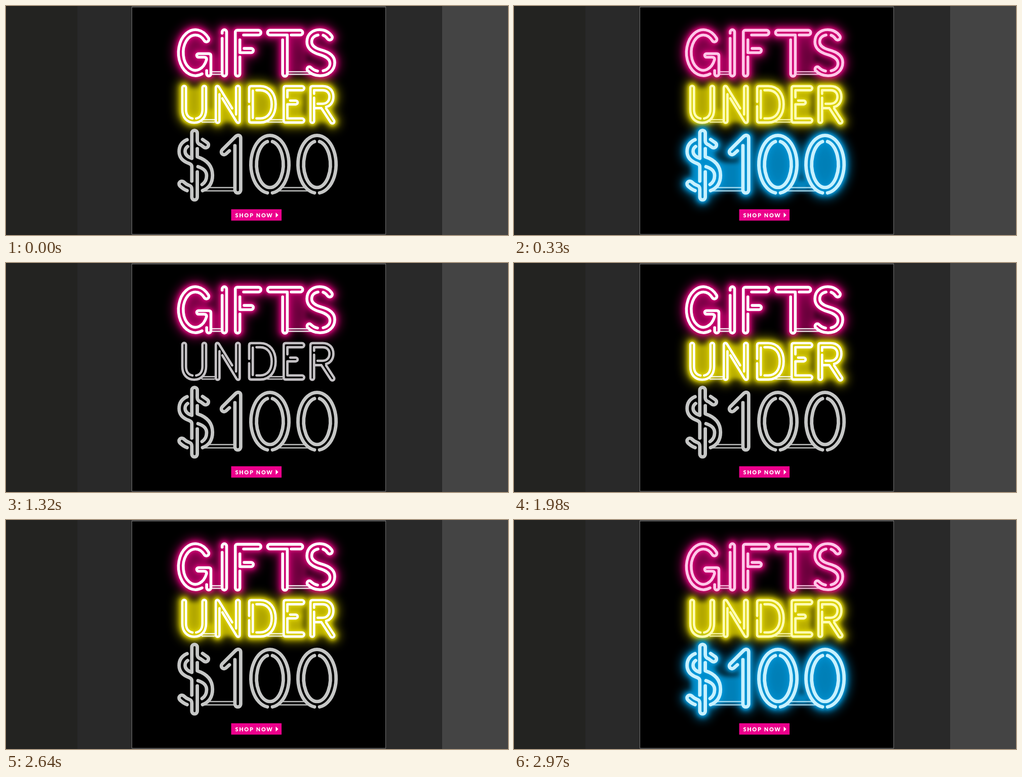
Recreate the animation shown at these times as an HTML page with a canvas. Size 991x454 px, loop 3.3 s.

```html
<!DOCTYPE html>
<html lang="en">
<head>
<meta charset="utf-8">
<title>Gifts under $100</title>
<style>
html, body { margin: 0; width: 100%; height: 100%; overflow: hidden; background: #292929; }
canvas { display: block; }
</style>
</head>
<body>
<canvas id="stage" width="991" height="454"></canvas>
<script>
const W = 991, H = 454, LOOP = 3300;
const ctx = document.getElementById('stage').getContext('2d');
const OFF = 0, WHITE = 1, TINT = 2;

// Each word: tube outlines, thin connectors, and the enclosed areas that fill with light.
const words = [
  {
    width: 5.6, off: '#c6c6c6', tint: '#ffc8e8', glow: '#e6007e', core: '#c4006f', fillAlpha: 0.5,
    tubes: [
      // G
      'M387 134.5A33.5 45.5 0 1 1 400 64A4.9 4.9 0 0 1 392 69.5A24 35 0 1 0 396 106' +
      'Q396 101.5 391 101.5H380a3.5 3.5 0 0 1 0-7H400Q404.5 94.5 404.5 99V134.5a4.2 4.2 0 0 1-8.4 0V128',
      // I
      'M426.7 54V51.5a4.4 4.4 0 0 1 8.8 0V134.5a4.4 4.4 0 0 1-8.8 0V64',
      // F
      'M469 57.5H498.5a4.7 4.7 0 0 0 0-9.4H457Q452.7 48 452.7 52.5V134.5a4.5 4.5 0 0 0 9 0V101',
      'M461.7 67V92.5H484a4.2 4.2 0 0 0 0-8.4H470',
      // T
      'M563 57.5H581a4.7 4.7 0 0 0 0-9.4H521a4.7 4.7 0 0 0 0 9.4H555.3V134.5a4.6 4.6 0 0 1-9.2 0V67',
      // S
      'M626 128.5C634 127 640 121 639.5 113C639 104 630 99.5 618 96C603 91.5 594 84 594 71' +
      'C594 56 605 47 619 47C630 47 638 52 643 59A4.8 4.8 0 0 1 635 65.5C632 61 629 59 626 58',
      'M616 57.5C608 59 603.5 64 603.5 71C603.5 80 612 84 622 87C639 91.5 649 99 649 112' +
      'C649 128 636 138.3 620 138.3C609 138.3 601 134 595 127.5A4.5 4.5 0 0 1 601.5 121.5C606 126 610 128 615 129'
    ],
    links: 'M407 130.3H424M407 135.3H424M558 130.3H600M558 135.3H602',
    fill: 'M374 58a24 35 0 1 0 .1 0ZM406 100H425V134H406ZM556 64H594V134H556Z'
  },
  {
    width: 4.8, off: '#c4c1c4', tint: '#fffcb4', glow: '#e6dc00', core: '#d2c600', fillAlpha: 0.78,
    tubes: [
      // U
      'M368 223C360 221.5 355.3 215 355.3 205V162a3.6 3.6 0 0 0-7.2 0V205C348 221 357 231.3 371.5 231.3' +
      'S395 221 395 205V162a3.6 3.6 0 0 0-7.2 0V205C387.8 215 383 221.5 375.5 223',
      // N
      'M446.5 203L421 161.5C418.5 157 414.2 158 414.2 163V228a3.6 3.6 0 0 0 7.2 0V175',
      'M427 183L454.5 228.5C457.5 233.5 461.4 232 461.4 227V162a3.6 3.6 0 0 0-7.2 0V215',
      // D
      'M480 190V163Q480 158.8 484 158.8H502C521 158.8 532.3 174 532.3 195S521 231 502 231H484Q480 231 480 227V199',
      'M487.2 168V222',
      'M494.5 167H502C516 167 524.5 178 524.5 195S516 222.8 502 222.8H494.5',
      // E
      'M555.5 181V167H584.5a4 4 0 0 0 0-8.1H552Q548.2 159 548.2 163V227Q548.2 231 552 231H584.5a4 4 0 0 0 0-8.1H555.5V195H572a3.7 3.7 0 0 0 0-7.4H561',
      // R
      'M608.2 174V167H625C633 167 638.5 172 638.5 180S633 193.8 625 193.8H615',
      'M632 203L647.5 227A3.8 3.8 0 0 1 641 231L622.5 202.5H608.2',
      'M632 200C641 198 646.3 190 646.3 180C646.3 167 638 158.8 625 158.8H605Q601 158.8 601 163V228a3.6 3.6 0 0 0 7.2 0V182'
    ],
    links: 'M388 225.4H412M386 230.2H412M520 225.4H546M516 230.2H546',
    fill: 'M350 162H392V228H350ZM386 205H414V230H386ZM414 162H461V230H414ZM480 160H530V230H480ZM528 200H548V230H528ZM548 160H586V230H548ZM601 160H642V230H601Z'
  },
  {
    width: 6.8, off: '#c6c7c6', tint: '#c8f1ff', glow: '#009fe3', core: '#0090cf', fillAlpha: 0.88,
    tubes: [
      // $
      'M388 264.5L398 271.5A5.6 5.6 0 0 1 391.5 280.5L384 275Q377.6 273 377.6 267V252a5.4 5.4 0 0 0-10.8 0V302' +
      'C358 299 353.5 295 353.5 288C353.5 284 355 281 358.5 278.5',
      'M357.5 265C347 269.5 341.7 278 341.7 288.5C341.7 301 350 308 361 312Q366.8 314 366.8 319V347',
      'M377.6 283V299C396 305 407.7 316 407.7 335.5C407.7 351 401 361 388 366',
      'M379 318.5C390 322 396 327 396 336.5C396 345 393 350 387 354',
      'M357.5 366C352 364 347 360.5 343 356.5A5.5 5.5 0 0 1 350.5 348.5C354 352 357 354 361 355.5Q366.8 357 366.8 363V379a5.4 5.4 0 0 0 10.8 0V329',
      // 1
      'M441 287L434.5 293A5.4 5.4 0 0 1 426.5 285.5L453 259C457.5 254.5 463.3 256 463.3 262V365a5.7 5.7 0 0 1-11.4 0V277',
      zero(521), zero(614)
    ],
    links: 'M397 360H449M392 366.5H449M543 360H593M537 366.5H599',
    fill: 'M521 268a26 45 0 1 0 .1 0ZM614 268a26 45 0 1 0 .1 0ZM400 310H454V366H380ZM554 345H581V366H554ZM350 275H396V358H350Z'
  }
];

function zero(cx) {
  return `M${cx - 5} 370.5A37.6 57.2 0 1 1 ${cx + 5} 370.5` +
         `M${cx + 5} 268.8A26.3 46 0 1 1 ${cx - 5} 268.8`;
}

// start time, then the state of each word
const timeline = [
  [0, WHITE, WHITE, OFF],
  [330, TINT, TINT, TINT],
  [990, OFF, OFF, OFF],
  [1320, WHITE, OFF, OFF],
  [1980, WHITE, WHITE, OFF],
  [2310, WHITE, WHITE, WHITE],
  [2640, WHITE, WHITE, OFF],
  [2970, TINT, TINT, TINT]
];

for (const word of words) {
  word.tubePath = new Path2D(word.tubes.join(''));
  word.linkPath = new Path2D(word.links);
  word.fillPath = new Path2D(word.fill);
  word.halo = makeHalo(word);
}

function roundPen(c, color, width) {
  c.strokeStyle = color;
  c.lineWidth = width;
  c.lineCap = c.lineJoin = 'round';
}

function makeHalo(word) {
  const layer = document.createElement('canvas');
  layer.width = W;
  layer.height = H;
  const c = layer.getContext('2d');
  const blurStroke = (extra, blur, alpha, color) => {
    c.filter = `blur(${blur}px)`;
    c.globalAlpha = alpha;
    roundPen(c, color, word.width + extra);
    c.stroke(word.tubePath);
  };
  blurStroke(20, 9, 0.5, word.core);
  c.filter = 'blur(4px)';
  c.globalAlpha = word.fillAlpha;
  c.fillStyle = word.core;
  c.fill(word.fillPath);
  blurStroke(10, 4.5, 0.75, word.core);
  blurStroke(4, 2, 0.6, word.glow);
  return layer;
}

function rect(color, x, y, w, h) {
  ctx.fillStyle = color;
  ctx.fillRect(x, y, w, h);
}

function drawBackdrop() {
  rect('#292929', 0, 0, W, H);
  rect('#232321', 0, 0, 141, H);
  rect('#444444', 861, 0, 130, H);
  rect('#747474', 248, 1, 502, 452);
  rect('#000', 249, 2.5, 500, 449.5);
}

function drawButton() {
  rect('#ec008c', 444.5, 403, 99.5, 22.5);
  ctx.fillStyle = '#fff';
  ctx.font = '900 10.8px Lato, "Open Sans", sans-serif';
  ctx.letterSpacing = '1.75px';
  ctx.fillText('SHOP NOW', 452.5, 418.5);
  ctx.beginPath();
  ctx.moveTo(532.5, 409.5);
  ctx.lineTo(537.5, 414.5);
  ctx.lineTo(532.5, 419.5);
  ctx.fill();
}

function drawWord(word, state) {
  const color = [word.off, '#fff', word.tint][state];
  roundPen(ctx, color, 2.7);
  ctx.lineCap = 'butt';
  ctx.globalAlpha = state === OFF ? 0.95 : 0.8;
  ctx.stroke(word.linkPath);
  ctx.globalAlpha = 1;
  roundPen(ctx, color, word.width);
  ctx.stroke(word.tubePath);
}

function draw(now) {
  const t = now % LOOP;
  const [, ...states] = timeline.filter(step => step[0] <= t).pop();
  drawBackdrop();
  words.forEach((word, i) => {
    if (states[i] !== OFF) ctx.drawImage(word.halo, 0, 0);
  });
  words.forEach((word, i) => drawWord(word, states[i]));
  drawButton();
}

const start = performance.now();
function tick() {
  draw(performance.now() - start);
  requestAnimationFrame(tick);
}
tick();
</script>
</body>
</html>
```
